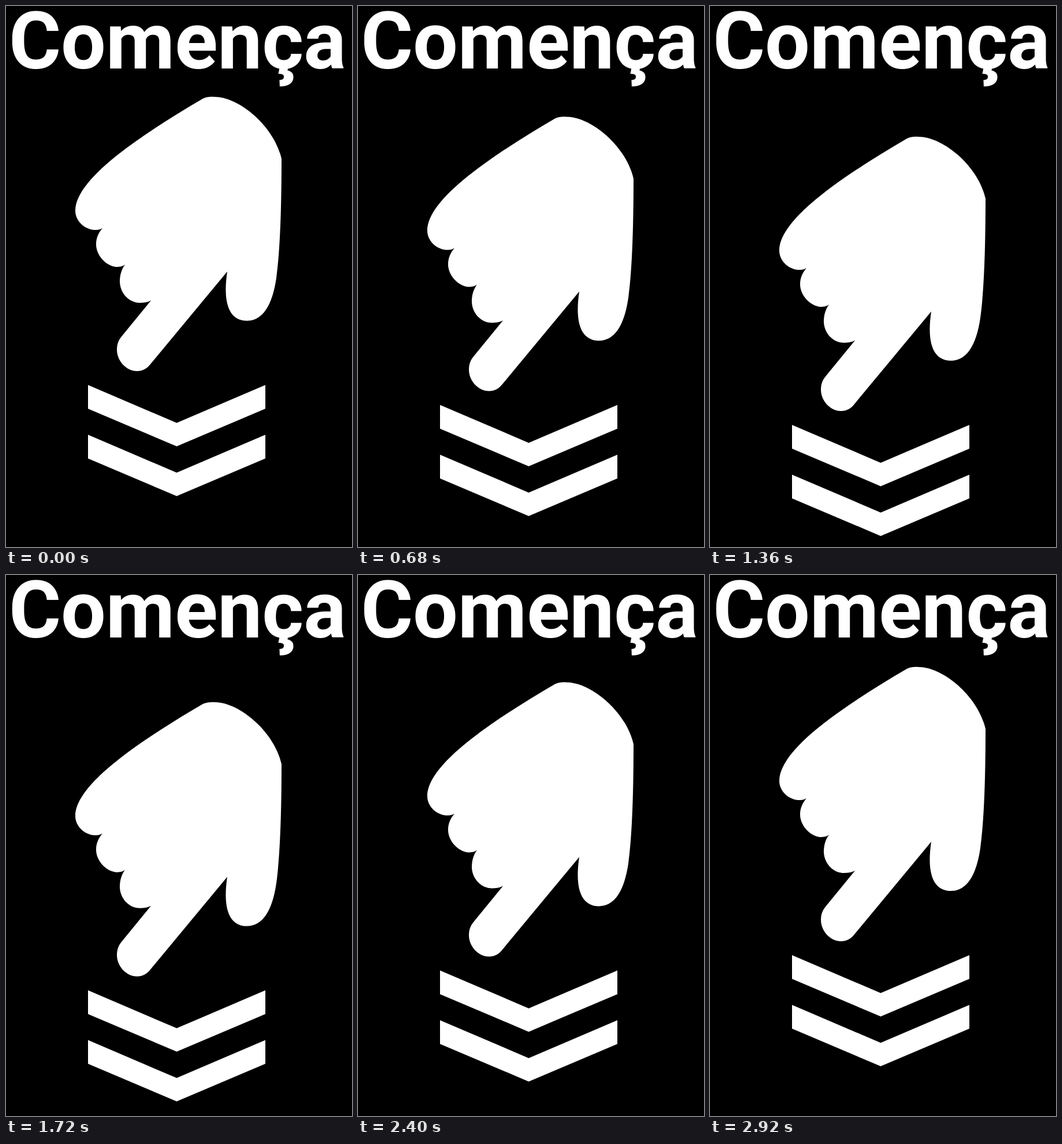
Recreate the animation shown at these times as an HTML page. Size 599x935 px, loop 2.96 s.

```html
<!DOCTYPE html>
<html lang="ca">
<head>
<meta charset="utf-8">
<title>Comença</title>
<style>
  html, body { margin: 0; width: 100%; height: 100%; overflow: hidden; background: #000; }
  svg { display: block; fill: #fff; }
  text { font: 700 138px Roboto, "Noto Sans", sans-serif; letter-spacing: -.3px; }
</style>
</head>
<body>
<svg width="599" height="935" viewBox="0 0 599 935">
  <text x="5" y="108">Comença</text>
  <g id="pointer">
    <path d="M341 160Q350 156 361 157C403 157 464 207 477 264
      C477 340 475 420 468 470C461 518 444 544 417 544C390 544 374 520 383 459
      L250 619C244 627 236 631 227 631C208 631 192 613 192 594C192 584 195 577 201 570
      L251 509C245 512 238 513 232 513C212 513 197 495 197 476C197 465 200 455 206 447
      C202 450 196 451 191 451C172 449 156 430 156 412C156 401 160 392 167 384
      C162 387 157 387 152 387C134 385 120 370 120 354C120 300 225 228 341 160Z"/>
    <path id="chevron" d="M142 655L295.5 720.5L449 655V696L295.5 761L142 696Z"/>
    <use href="#chevron" y="86"/>
  </g>
</svg>
<script>
  const LOOP = 2960, STEP = 40, TRAVEL = 75;
  const pointer = document.getElementById('pointer');
  const start = performance.now();

  // Steady travel down and back up, in 40 ms steps
  function draw() {
    const elapsed = Math.max(0, performance.now() - start) % LOOP;
    const t = Math.floor(elapsed / STEP) * STEP;
    const y = TRAVEL * (1 - Math.abs(1 - 2 * t / LOOP));
    pointer.setAttribute('transform', `translate(0 ${y})`);
    requestAnimationFrame(draw);
  }
  draw();
</script>
</body>
</html>
```
